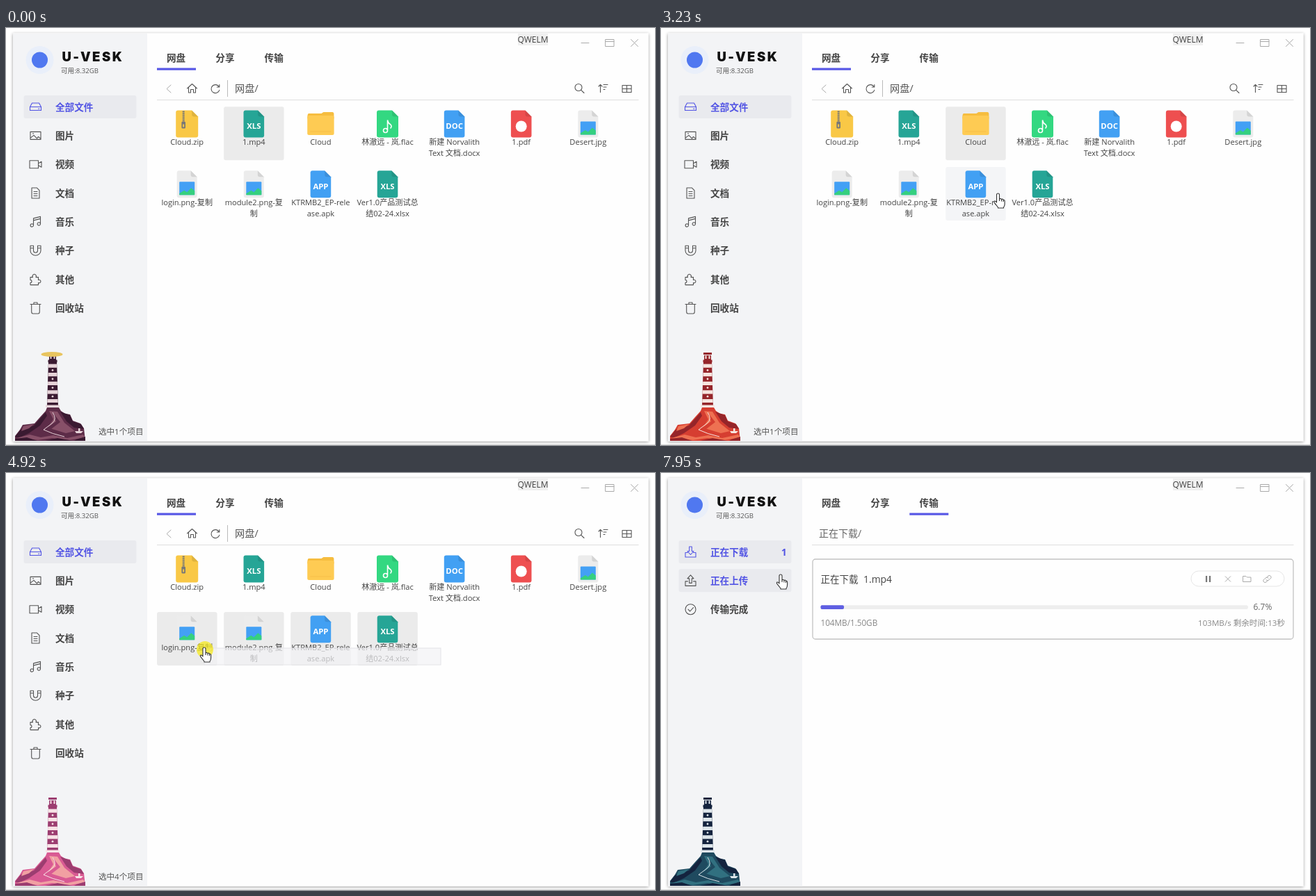
An HTML page that plays this animation: 933 px wide and 600 px high, repeating every 8 s.

```html
<!DOCTYPE html>
<html lang="zh-CN">
<head>
<meta charset="utf-8">
<title>网盘</title>
<style>
  html, body { margin: 0; width: 100%; height: 100%; overflow: hidden; background: #fff; }
  svg { display: block; width: 933px; height: 600px; }
  text { font-family: "Open Sans", "Noto Sans CJK SC", "Noto Sans CJK", "Noto Sans", sans-serif; white-space: pre; }
  .bold { font-weight: 700; }
  .line { fill: none; stroke: #555; stroke-width: 1.1; stroke-linejoin: round; stroke-linecap: round; }
  .faint { stroke: #aaa; stroke-width: 1; }
  .nav.on text, .nav.hover text { fill: #5254e4; }
  .nav.on .line { stroke: #5254e4; }
  .bg { fill: none; }
  .nav.on .bg, .nav.hover .bg { fill: #e9eaee; }
  .cell.hover .bg { fill: #f4f5f7; }
  .cell.on .bg { fill: #ebebeb; }
  .item.hover .bg { fill: #f2f3f5; }
  .dark { fill: var(--c0); }
  .mid { fill: var(--c1); }
  .light { fill: var(--c2); }
  .pale { fill: var(--c3); }
</style>
</head>
<body>
<svg id="stage" viewBox="0 0 933 600"></svg>
<script>
const LOOP = 8000;
const ACCENT = '#5254e4';

// Markup helpers
const text = (x, y, str, size, fill = '#444', extra = '') =>
  `<text x="${x}" y="${y}" font-size="${size}" fill="${fill}" ${extra}>${str}</text>`;
const rect = (x, y, w, h, fill, extra = '') =>
  `<rect x="${x}" y="${y}" width="${w}" height="${h}" fill="${fill}" ${extra}/>`;
const path = (d, extra) => `<path d="${d}" ${extra}/>`;
const icon = (x, y, d, cls = 'line') =>
  `<path class="${cls}" transform="translate(${x} ${y})" d="${d}"/>`;
const MIDDLE = 'text-anchor="middle"', END = 'text-anchor="end"', BOLD = 'class="bold"';

// Sidebar
const rowY = i => 113.5 + i * 41.35;
const navRow = ([label, d], i) => `<g class="nav">
  <rect class="bg" x="25.5" y="${rowY(i) - 16.5}" width="162" height="33" rx="3"/>
  ${icon(42.5, rowY(i), d)}${text(71, rowY(i) + 5, label, 13.6, '#444', BOLD)}</g>`;

const FILE_NAV = [
  ['全部文件', 'M-8 0L-5 -5.5H5L8 0V5H-8ZM-8 0H8M4 2.7H5.5'],
  ['图片', 'M-7.5 -5.5H7.5V5.5H-7.5ZM-7 3L-2.5 -.5L2 4L4 1.5L7 4M-4 -3H-3'],
  ['视频', 'M-8.5 -5.5H4V5.5H-8.5ZM4 -1.5L8.5 -4V4L4 1.5'],
  ['文档', 'M-5.5 -7.5H2L5.5 -4V7.5H-5.5ZM-2.5 -2H2.5M-2.5 1H2.5M-2.5 4H2.5'],
  ['音乐', 'M-3 5V-5L7 -7.5V3M-3 -2L7 -4.5M-3 5a2.2 2.2 0 1 1-4.4 0a2.2 2.2 0 1 1 4.4 0M7 3a2.2 2.2 0 1 1-4.4 0a2.2 2.2 0 1 1 4.4 0'],
  ['种子', 'M-7.5 -7H-3V0A3 3 0 0 0 3 0V-7H7.5V0A7.5 7 0 0 1-7.5 0ZM-7.5 -3.5H-3M3 -3.5H7.5'],
  ['其他', 'M-7.5 -3H-4a2.7 2.7 0 1 1 4.5 0H4V1a2.3 2.3 0 1 1 0 4V8H-7.5V5a2 2 0 1 0 0-4Z'],
  ['回收站', 'M-7.5 -5.5H7.5M-5.8 -5.5V5Q-5.8 8-3.8 8H3.8Q5.8 8 5.8 5V-5.5M-2.5 -5.5V-8H2.5V-5.5'],
];
const TRANSFER_NAV = [
  ['正在下载', 'M-4 1H-7.5V7.5H7.5V1H4M-1.8 -7.5H1.8V-1H4.5L0 4L-4.5 -1H-1.8Z'],
  ['正在上传', 'M-4 1H-7.5V7.5H7.5V1H4M-1.8 3.5H1.8V-3H4.5L0 -8L-4.5 -3H-1.8Z'],
  ['传输完成', 'M7.5 0A7.5 7.5 0 1 1-7.5 0A7.5 7.5 0 1 1 7.5 0M-3.5 0L-.8 2.8L4 -2.5'],
];

// File artwork, centred on x = 0 with its top at y = 0
const sheet = (color, inner, half = 14.8) =>
  path(`M${3 - half} 0H${half - 9}L${half} 9V36Q${half} 39 ${half - 3} 39H${3 - half}Q${-half} 39 ${-half} 36V3Q${-half} 0 ${3 - half} 0Z`, `fill="${color}"`) +
  path(`M${half - 9} 0L${half} 9H${half - 6}Q${half - 9} 9 ${half - 9} 6Z`, 'fill="#000" opacity=".1"') + inner;
const tagged = (color, tag) => sheet(color, text(0, 26.8, tag, 11.3, '#fff', `${BOLD} ${MIDDLE}`));
const zip = () => sheet('#f9c846',
  path('M-5 1V17', 'stroke="#777" stroke-width="3" stroke-dasharray="2 1"') +
  rect(-7.8, 16, 5.6, 10, '#777', 'rx="1.5"') + rect(-6, 20, 2, 4, '#f9c846'), 16);
const folder = () =>
  path('M-19 9Q-19 4.5-17 4.5H1L4 2.5H17Q19 2.5 19 5V12H-19Z', 'fill="#f6bd3f"') +
  rect(-19.2, 7.5, 38.4, 28, '#fecb53', 'rx="2.5"') + rect(-15, 30, 30, 1, '#f7c04a');
const music = () => sheet('#33d881',
  path('M0 29V14Q1 19 4 20Q7 23 4 26M0 29a3 3 0 1 1-6 0a3 3 0 1 1 6 0', 'fill="none" stroke="#fff" stroke-width="1.6"'), 15.5);
const pdf = () => sheet('#ee4f50', '<circle cy="23" r="8" fill="#fff"/>');
const picture = () => sheet('#ececec',
  rect(-11, 16, 22, 19, '#43a0f5', 'rx="1"') +
  path('M-11 33L-4 28.5L0 31L6 25L11 29V35H-11Z', 'fill="#35d07f"'), 14.5);

const FILES = [
  [zip(), 'Cloud.zip'], [tagged('#26a596', 'XLS'), '1.mp4'], [folder(), 'Cloud'],
  [music(), '林澈远 - 岚.flac'], [tagged('#42a0f3', 'DOC'), '新建 Norvalith', 'Text 文档.docx'],
  [pdf(), '1.pdf'], [picture(), 'Desert.jpg'], [picture(), 'login.png-复制'],
  [picture(), 'module2.png-复', '制'], [tagged('#42a0f3', 'APP'), 'KTRMB2_EP-rele', 'ase.apk'],
  [tagged('#26a596', 'XLS'), 'Ver1.0产品测试总', '结02-24.xlsx'],
];
const CELL_W = 86.5, CELL_H = 77;
const cellPos = i => [217 + (i % 7) * 96.1, 113.3 + Math.floor(i / 7) * 86.7];
const fileCell = ([art, ...lines], i) => {
  const [x, y] = cellPos(i);
  return `<g class="cell" transform="translate(${x} ${y})">
    <rect class="bg" width="${CELL_W}" height="${CELL_H}" rx="3"/>
    <g transform="translate(43.2 5.2)">${art}</g>
    ${lines.map((s, n) => text(43.2, 55.2 + n * 15.6, s, 11.1, '#444', MIDDLE)).join('')}</g>`;
};

// Context menu
const MENU = [['打开', 'Ctrl+O'], ['下载', 'Ctrl+O'], ['移动到', ''], ['复制', 'Ctrl+C'], ['剪切', 'Ctrl+X'],
  ['重命名', 'Ctrl+M/F2'], ['删除', 'Delete'], ['分享', ''], ['属性', 'Alt+Enter']];
const menuItem = ([label, keys], i) => `<g class="item" transform="translate(379 ${160.8 + i * 30.8})">
  <rect class="bg" width="154" height="30.8"/>${text(10, 19.5, label, 11.7)}
  ${text(144.5, 19.5, keys, 12.2, '#b3b3b3', END)}</g>`;

// Lighthouse
const stripes = Array.from({ length: 5 }, (_, i) => {
  const y = 483.5 + i * 12.6, half = 6 + i * .4;
  return path(`M${67 - half} ${y}H${67 + half}L${67.2 + half} ${y + 5.2}H${66.8 - half}Z`, 'class="pale"') +
    (i ? `<circle cx="67" cy="${y - 3.7}" r="1.4" class="pale"/>` : '');
}).join('');
const lighthouse = `
  ${path('M61 479H73L75 545H59Z', 'class="dark"')}${stripes}
  ${path('M61 467H73V470H61ZM62 471H72V478H62ZM60.5 477.5H73.5V481H60.5Z', 'class="dark"')}
  ${path('M63.5 471.5H65.5V476H63.5ZM68.5 471.5H70.5V476H68.5Z', 'class="pale"')}
  ${path('M13 594V587L20 578L24 571L41 569L48 561L57 551L59 546H76L79 551L85 555L92 556L96 565L107 569L112 576L114 594Z', 'class="mid"')}
  ${path('M13 588L21 578L40 572L49 562L57 553L59 558L49 572L33 583L18 590ZM78 552L92 557L96 566L108 570L112 577L98 575L87 566Z', 'class="dark"')}
  ${path('M62 551L74 552L84 568L99 580L86 583L60 575L68 563ZM25 573L40 570L33 576L22 580Z', 'class="light"')}
  ${path('M67 553L72 566L54 579L82 588L98 586L73 581L65 577L78 567Z', 'class="mid"')}
  ${path('M15 590L34 585L50 589L68 586L88 590L111 585L114 589L92 593L66 590L46 593Z', 'class="light"')}
  ${path('M13 591L30 589L45 594H13ZM56 594L74 590L96 594ZM101 592L114 588V594H98Z', 'class="dark"')}
  ${path('M67 553Q74 563 66 569T54 578Q66 584 84 588', 'fill="none" stroke="var(--c3)" stroke-width="1"')}
  ${path('M57 542.5H77V545.5H57ZM99 580H111L108 583H101ZM104 576H106.5V580H104Z', 'class="pale"')}`;

const hand = 'M-2 12V2Q-2 0 0 0T2 2V8Q4 6.6 5 8.5Q7 7.5 7.6 9.4Q9.6 9 9.6 11V15Q9.6 18 8 20V21H0V20L-5 13.6Q-6.3 11.6-5 11Q-3.6 10.7-2 13ZM2 8V11M5 8.5V11.5M7.6 9.4V12';

document.getElementById('stage').innerHTML = `
  <defs><filter id="soft" x="-10%" y="-10%" width="120%" height="120%">
    <feDropShadow dx="0" dy="1" stdDeviation="2.2" flood-opacity=".42"/></filter></defs>
  ${rect(0, 599, 933, 1, '#ddd')}
  ${rect(10, 7.5, 913.5, 587, '#fefefe', 'filter="url(#soft)"')}
  ${rect(10, 7.5, 193, 587, '#f3f4f6')}
  <circle cx="48.5" cy="46" r="20" fill="#e9effa"/><circle cx="48.5" cy="46" r="11.5" fill="#5078f0"/>
  ${text(80.5, 48.3, 'U-VESK', 18.5, '#111', 'style="font:900 18.5px Inter,sans-serif;letter-spacing:2.5px"')}
  ${text(79, 64.8, '可用:8.32GB', 9.6, '#555')}
  ${rect(736, 8, 43, 17, '#f0f0f0')}${text(757.5, 21, 'QWELM', 12, '#444', MIDDLE)}
  ${icon(0, 0, 'M827 21.5H838M862 16.5H874V26.5H862ZM862 19.5H874M898.5 16.5L908.5 26.5M908.5 16.5L898.5 26.5', 'line faint')}
  ${['网盘', '分享', '传输'].map((s, i) => text(231 + i * 70.3, 48, s, 13.6, '#444', BOLD)).join('')}
  <rect id="underline" y="57.5" width="56" height="3.2" fill="#5757e6"/>
  ${rect(217, 103, 692.5, 1, '#dedede')}
  <g id="files">
    ${FILE_NAV.map(navRow).join('')}
    ${icon(0, 0, 'M237 82L231 87.5L237 93', 'line faint')}
    ${icon(267.5, 87, 'M-7 0L0 -6.5L7 0M-5 -1.5V6H-2V1.5H2V6H5V-1.5')}
    ${icon(301, 87.5, 'M5.3 -2.8A6 6 0 1 0 5.8 1.8M5.8 -6V-2.5H2.3')}
    ${rect(318, 75, 1, 24, '#bbb')}${text(329, 92.3, '网盘/', 14.2, '#555')}
    ${icon(824, 86.5, 'M4 -1A5 5 0 1 1-6 -1A5 5 0 1 1 4 -1M2.8 2.8L7 7')}
    ${icon(858.5, 87, 'M-4 5.5V-5.5M-6.5 -3L-4 -5.5L-1.5 -3M.5 -5.5H6.5M.5 -2H4.5M.5 1.5H2.5')}
    ${icon(892.5, 87.5, 'M-6.5 -5H6.5V5H-6.5ZM0 -5V5M-6.5 0H6.5')}
    ${FILES.map(fileCell).join('')}
    <text id="status" x="197.5" y="585" font-size="11.6" fill="#555" ${END}></text>
    <rect id="band" fill="#f4f4f6" fill-opacity=".68" stroke="#e4e4e7"/>
    <g id="menu"><rect x="379" y="161" width="154" height="276" fill="#fff" filter="url(#soft)"/>
      ${MENU.map(menuItem).join('')}</g>
  </g>
  <g id="transfer">
    ${TRANSFER_NAV.map(navRow).join('')}
    ${text(227, 92.3, '正在下载/', 14, '#666')}
    <g id="task">
      ${text(177, 118.7, '1', 13.6, ACCENT, `${BOLD} ${MIDDLE}`)}
      ${rect(218, 124, 691, 115, 'none', 'rx="4" stroke="#c2c2c2" stroke-width="1.3"')}
      ${text(229.5, 157.7, '正在下载', 13.5)}${text(291, 157.7, '1.mp4', 13.9)}
      ${rect(762, 141, 134, 22, '#fff', 'rx="11" stroke="#e6e6e6"')}
      ${rect(783, 148, 2.2, 9, '#777')}${rect(788, 148, 2.2, 9, '#777')}
      ${icon(815, 152.5, 'M-3.7 -3.7L3.7 3.7M3.7 -3.7L-3.7 3.7', 'line faint')}
      ${icon(842.5, 152.5, 'M-5.5 -4H-1.5L0 -2.5H5.5V4H-5.5Z', 'line faint')}
      ${icon(871.5, 152.5, 'M-1 -2L1.5 -4.5Q4 -6 5.3 -3.8T4 0L1.5 2Q-.5 3-1.7 1.2M1 2L-1.5 4.5Q-4 6-5.3 3.8T-4 0L-1.5 -2Q.5 -3 1.7 -1.2', 'line faint')}
      ${rect(229.5, 190.3, 614.5, 5.6, '#eee', 'rx="2.5"')}${rect(229.5, 190.3, 33.5, 5.6, '#5f5fe2', 'rx="2"')}
      ${text(851.5, 197, '6.7%', 12, '#666')}${text(229.5, 220, '104MB/1.50GB', 11.7, '#888')}
      ${text(897, 220, '103MB/s 剩余时间:13秒', 11.6, '#888', END)}
    </g>
  </g>
  ${lighthouse}
  <ellipse id="lamp" cx="66" cy="469.5" rx="15.5" ry="3.6" fill="#e8c45f"/>
  <g id="cursor"><circle id="press" cx="1" cy="3" r="12" fill="#f5ea1f" opacity=".75"/>
    ${path(hand, 'fill="#fff" stroke="#333" stroke-width="1.1" stroke-linejoin="round"')}</g>`;

// Timeline
const POINTER = [[70, 530, 300], [450, 258, 160], [900, 262, 160], [1220, 372, 165], [1600, 372, 165],
  [1750, 374, 164], [2370, 460, 160], [2600, 460, 160], [3230, 484.5, 238], [3470, 486, 240],
  [3850, 620, 285], [4200, 625, 276], [4300, 625, 276], [4460, 532, 257], [4830, 285, 251],
  [5150, 285, 251], [5850, 379, 161], [6300, 379, 161], [6700, 402, 207], [6880, 402, 207],
  [7500, 385, 43], [7720, 385, 43], [7950, 172, 146]];
const PRESSES = [[480, 610], [1650, 1780], [2560, 2680], [3880, 4000], [4300, 5080], [5400, 5500], [6760, 6860], [7540, 7640]];
const SELECTED = [[0, [1]], [520, [0]], [1680, [1]], [2580, [2]], [3300, FILES.map((_, i) => i)],
  [3900, []], [5400, []], [6000, [1]]];
const DRAG = { from: 4300, to: 5060, clear: 5400, x: 625, y: 276 };
const SHOW_MENU = [6070, 6850], SWITCH_TAB = 7560, SHOW_TASK = 7720;

const THEME = {
  plum: ['#3a1a31', '#5d2c48', '#875068', '#e6d3d8'],
  rust: ['#742825', '#b64534', '#dc8260', '#f3dfd4'],
  red: ['#95252a', '#d63e31', '#ee7152', '#f6e5df'],
  navy: ['#14233e', '#1f4a5f', '#317080', '#dde5ea'],
  pink: ['#9c3d70', '#d95a93', '#f1a0a2', '#f8e2e6'],
  green: ['#10271f', '#24543f', '#42845f', '#dee6dc'],
};
const COLORS = [[0, 'plum'], [1220, 'rust'], [1600, 'rust'], [3230, 'red'], [4460, 'navy'],
  [4920, 'pink'], [6150, 'green'], [7950, 'navy']];

const within = (t, [a, b]) => t >= a && t < b;
const latest = (keys, t) => keys.findLast(k => k[0] <= t) || keys[0];
const segment = (keys, t) => {
  const a = latest(keys, t), b = keys.find(k => k[0] > t) || a;
  return [a, b, a === b ? 0 : Math.max(0, (t - a[0]) / (b[0] - a[0]))];
};
const pointer = t => {
  const [a, b, u] = segment(POINTER, t);
  return [1, 2].map(i => a[i] + (b[i] - a[i]) * u);
};
const inBox = (px, py, x, y, w, h) => px >= x && px < x + w && py >= y && py < y + h;

// The rubber band trails the pointer slightly
function dragBox(t) {
  const [x, y] = pointer(Math.max(DRAG.from, Math.min(t, DRAG.to) - 77));
  return { x, y: y + 1, w: DRAG.x - x, h: Math.max(0, DRAG.y - y - 1) };
}
function selection(t) {
  if (!within(t, [DRAG.from, DRAG.clear])) return latest(SELECTED, t)[1];
  const b = dragBox(t);
  return FILES.map((_, i) => i).filter(i => {
    const [x, y] = cellPos(i);
    return x < b.x + b.w && x + CELL_W > b.x && y < b.y + b.h && y + CELL_H > b.y;
  });
}

const $ = id => document.getElementById(id);
const all = sel => [...document.querySelectorAll(sel)];
const show = (id, on) => { $(id).style.display = on ? '' : 'none'; };
const set = (el, attrs) => Object.entries(attrs).forEach(([k, v]) => el.setAttribute(k, v));
const cells = all('.cell'), items = all('.item');
const navs = [all('#files .nav'), all('#transfer .nav')];

function render(t) {
  const [x, y] = pointer(t);
  const visible = t >= 70, menu = within(t, SHOW_MENU), transfer = t >= SWITCH_TAB;
  const dragging = within(t, [DRAG.from, DRAG.to]);
  const hot = visible && !menu && !dragging;

  show('files', !transfer);
  show('transfer', transfer);
  show('task', t >= SHOW_TASK);
  show('menu', menu);
  show('band', dragging);
  show('cursor', visible);
  show('press', PRESSES.some(p => within(t, p)));
  show('lamp', t < 150);
  set($('underline'), { x: transfer ? 357.3 : 217 });
  set($('cursor'), { transform: `translate(${x} ${y})` });

  const picked = selection(t);
  $('status').textContent = picked.length ? `选中${picked.length}个项目` : '';
  cells.forEach((cell, i) => {
    cell.classList.toggle('on', picked.includes(i));
    cell.classList.toggle('hover', hot && inBox(x, y, ...cellPos(i), CELL_W, CELL_H));
  });
  items.forEach((item, i) =>
    item.classList.toggle('hover', t > 6400 && inBox(x, y, 379, 160.8 + i * 30.8, 154, 30.8)));
  navs.forEach(rows => rows.forEach((row, i) => {
    row.classList.toggle('on', i === 0);
    row.classList.toggle('hover', hot && inBox(x, y, 25.5, rowY(i) - 16.5, 162, 33));
  }));
  if (dragging) {
    const b = dragBox(t);
    set($('band'), { x: b.x, y: b.y, width: b.w, height: b.h });
  }

  const [a, b, u] = segment(COLORS, t);
  THEME[a[1]].forEach((color, i) => $('stage').style.setProperty(`--c${i}`,
    `color-mix(in srgb, ${THEME[b[1]][i]} ${u * 100}%, ${color})`));
}

let start;
function tick(now) {
  start ??= now;
  render((now - start) % LOOP);
  requestAnimationFrame(tick);
}
render(0);
requestAnimationFrame(tick);
</script>
</body>
</html>
```
